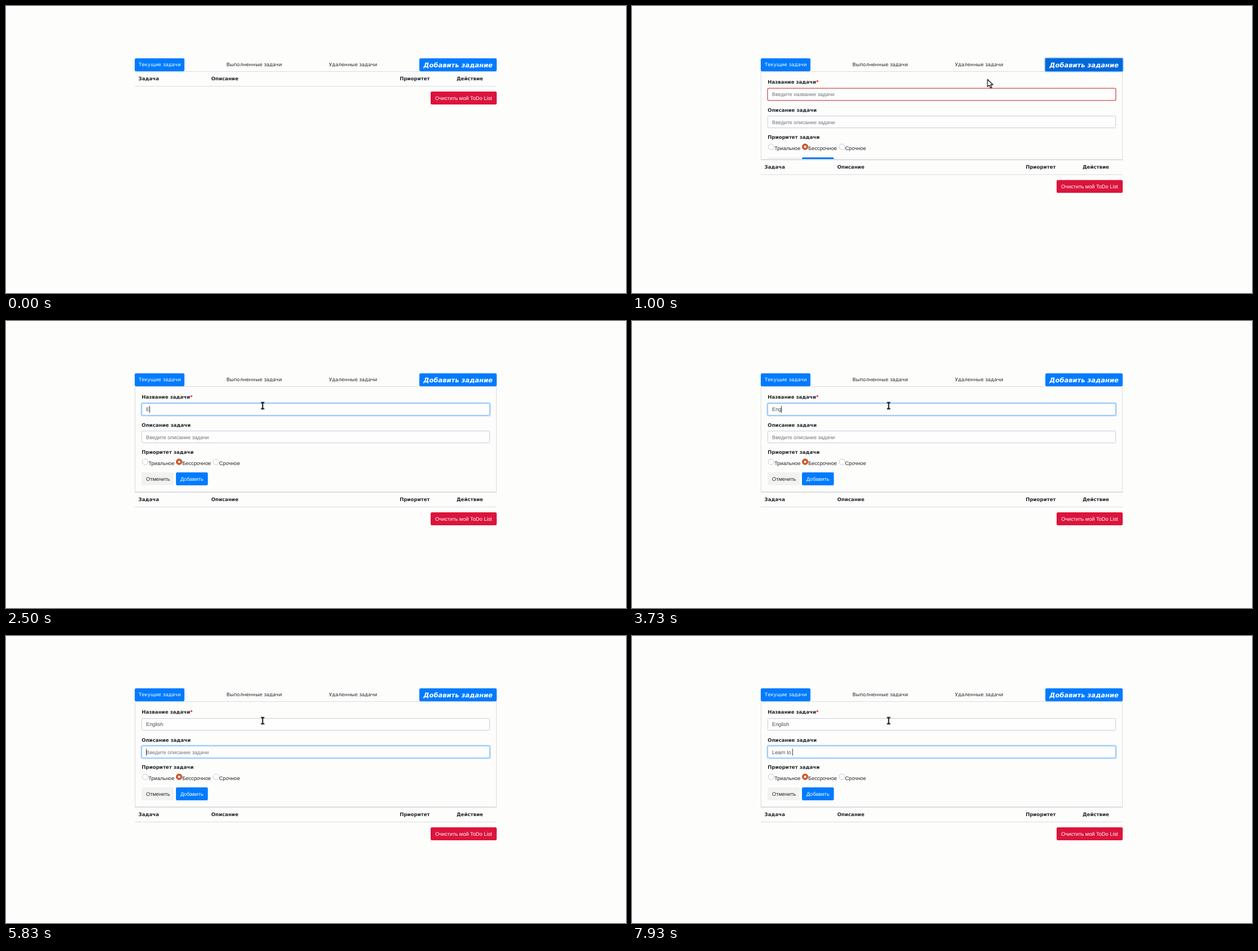
Recreate the animation shown at these times as an HTML page. Size 1098 by 510 pixels, loop 8000 ms.

```html
<!DOCTYPE html>
<html lang="ru">
<head>
<meta charset="utf-8">
<title>ToDo List</title>
<style>
  html, body { margin: 0; width: 100%; height: 100%; overflow: hidden; background: #fdfdfc; }
  #stage { position: absolute; left: 0; top: 0; width: 1098px; height: 510px; overflow: hidden; }
  svg { position: absolute; left: 0; top: 0; width: 1098px; height: 510px; overflow: hidden; }
  text { font: 9.25px "Liberation Sans", Arial, sans-serif; fill: #212529; text-rendering: geometricPrecision; white-space: pre; }
  .nav, .head { font: 8.65px "DejaVu Sans", Verdana, sans-serif; }
  .head { font-weight: bold; }
  .add { font: italic bold 11.5px "DejaVu Sans", Verdana, sans-serif; }
  .light { fill: #fff; }
  .hint { fill: #6c757d; }
  .typed { fill: #495057; }
  .star { fill: #f00; }
  .line { stroke: #dadcdf; fill: none; }
  .blue { fill: #007bff; }
  .field { fill: #fff; fill-opacity: .4; stroke: #cbccd8; }
  .ring { fill: none; stroke: #80bdff; }
  .halo { fill: none; stroke: #007bff; stroke-opacity: .27; stroke-width: 1.6; }
  .radio { fill: #fff; stroke: #c6c6d2; }

  #form { position: absolute; left: 228px; top: 116px; width: 641px; box-sizing: border-box;
          overflow: hidden; border-bottom: 1px solid #dadcdf; }
  #form svg { left: -228px; top: -116px; }

  #form, #table, #pointer, .fade, .shape { animation: 8s linear infinite; }
  #form { animation-name: unfold; }
  #table { animation-name: push; }
  #pointer { animation-name: travel; }
  #hover { animation-name: hover; }
  #glow { animation-name: glow; }
  #invalid { animation-name: invalid; }
  #focus1 { animation-name: focus1; }
  #focus2 { animation-name: focus2; }
  .shape { animation-timing-function: step-end; }
  #arrow { animation-name: arrow; }
  #hand { animation-name: hand; }
  #beam { animation-name: beam; }

  @keyframes unfold {
    0% { height: 1px; }
    10.17% { height: 1px; animation-timing-function: ease; }
    14.54%, 100% { height: 188px; }
  }
  @keyframes push {
    0% { transform: translateY(0); }
    10.17% { transform: translateY(0); animation-timing-function: ease; }
    14.54%, 100% { transform: translateY(188px); }
  }
  @keyframes travel {
    0%, 1% { transform: translate(887px, -22px); }
    6%, 10.3% { transform: translate(824.5px, 113.5px); }
    12.5% { transform: translate(630.5px, 130px); animation-timing-function: ease-out; }
    16.5%, 21.9% { transform: translate(453.5px, 150.5px); }
    22%, 100% { transform: translate(454.5px, 150.5px); }
  }
  @keyframes hover { 0%, 5.2% { opacity: 0; } 7%, 17.75% { opacity: 1; } 19.6%, 100% { opacity: 0; } }
  @keyframes glow { 0%, 9.1% { opacity: 0; } 11%, 17.75% { opacity: 1; } 19.6%, 100% { opacity: 0; } }
  @keyframes invalid { 0%, 17.75% { opacity: 1; } 19.6%, 100% { opacity: 0; } }
  @keyframes focus1 { 0%, 17.75% { opacity: 0; } 19.6%, 68.75% { opacity: 1; } 70.6%, 100% { opacity: 0; } }
  @keyframes focus2 { 0%, 68.75% { opacity: 0; } 70.6%, 100% { opacity: 1; } }
  @keyframes arrow { 0% { opacity: 1; } 5.2% { opacity: 0; } 10.6% { opacity: 1; } 14.5%, 100% { opacity: 0; } }
  @keyframes hand { 0% { opacity: 0; } 5.2% { opacity: 1; } 10.6%, 100% { opacity: 0; } }
  @keyframes beam { 0% { opacity: 0; } 14.5%, 100% { opacity: 1; } }
</style>
</head>
<body>
<div id="stage">
  <div id="form">
    <svg>
      <path class="line" d="M228.5 116V304M868.5 116V304"/>
      <text class="head" x="240.3" y="138">Название задачи<tspan class="star">*</tspan></text>
      <rect class="field" x="240.5" y="146.5" width="616" height="21" rx="2"/>
      <rect class="fade" id="invalid" x="240.2" y="146.2" width="616.6" height="21.6" rx="2.4" fill="none" stroke="#dd6a6a" stroke-width="1.6"/>
      <g class="fade" id="focus1">
        <rect class="halo" x="239.2" y="145.2" width="618.6" height="23.6" rx="3"/>
        <rect class="ring" x="240.5" y="146.5" width="616" height="21" rx="2"/>
      </g>

      <text class="head" x="240.3" y="188">Описание задачи</text>
      <rect class="field" x="240.5" y="195.5" width="616" height="21" rx="2"/>
      <g class="fade" id="focus2">
        <rect class="halo" x="239.2" y="194.2" width="618.6" height="23.6" rx="3"/>
        <rect class="ring" x="240.5" y="195.5" width="616" height="21" rx="2"/>
      </g>

      <text class="hint" id="hint1" x="248" y="160.4">Введите название задачи</text>
      <text class="hint" id="hint2" x="248" y="209.8">Введите описание задачи</text>
      <text class="typed" id="typed1" x="248" y="160.4" xml:space="preserve"></text>
      <text class="typed" id="typed2" x="248" y="209.8" xml:space="preserve"></text>
      <rect id="caret" width="1" height="12" fill="#343a40"/>

      <text class="head" x="240.3" y="236">Приоритет задачи</text>
      <circle class="radio" cx="246.4" cy="250.3" r="5.1"/>
      <circle cx="306.6" cy="250.2" r="5.1" fill="#dc5a28" stroke="#a8461f"/>
      <circle cx="306.6" cy="250.2" r="2" fill="#fff"/>
      <circle class="radio" cx="371.9" cy="250.3" r="5.1"/>
      <text x="252.2" y="255.8">Триальное</text>
      <text x="312.2" y="255.8">Бессрочное</text>
      <text x="377.4" y="255.8">Срочное</text>

      <rect x="240" y="269" width="57" height="23" rx="2.3" fill="#f2f2f1"/>
      <text x="248" y="283.6">Отменить</text>
      <rect class="blue" x="301" y="269" width="56.5" height="23" rx="2.3"/>
      <text class="light" x="308.7" y="283.6">Добавить</text>
    </svg>
  </div>

  <svg>
    <g id="table">
      <path class="line" d="M228 116.5H869M228 142.5H869"/>
      <text class="head" x="234.6" y="132">Задача</text>
      <text class="head" x="363.4" y="132">Описание</text>
      <text class="head" x="697.2" y="132">Приоритет</text>
      <text class="head" x="797.9" y="132">Действие</text>
      <rect x="752" y="152" width="117" height="23" rx="2.3" fill="#dc143c"/>
      <text class="light" x="760" y="166.5">Очистить мой ToDo List</text>
    </g>

    <path class="line" d="M228 116.5H869"/>
    <rect class="blue" x="228" y="93" width="88" height="23" rx="2.3"/>
    <text class="nav light" x="235" y="107">Текущие задачи</text>
    <text class="nav" x="390.5" y="107">Выполненные задачи</text>
    <text class="nav" x="572" y="107">Удаленные задачи</text>
    <rect class="fade" id="glow" x="730.5" y="91.5" width="140" height="26" rx="3.6" fill="#80bdff"/>
    <rect class="blue" x="732" y="93" width="137" height="23" rx="2.3"/>
    <rect class="fade" id="hover" x="732" y="93" width="137" height="23" rx="2.3" fill="#0069d9"/>
    <text class="add light" x="739.3" y="108.5">Добавить задание</text>

    <g id="pointer" stroke="#000" fill="#fff" stroke-linejoin="round">
      <path class="shape" id="arrow" stroke-width="1.2" d="M0 .3V13.4L3.1 10.6 5.3 15.6 7.5 14.6 5.4 9.8H9.6Z"/>
      <path class="shape" id="hand" stroke-width="1.2" d="M-1.5 1Q0-.8 1.5 1V5.2L6 6Q7.8 6.3 7.8 8V10.4L6.8 13.6H-.6L-4.2 9Q-4.4 7.3-3 7.5L-1.5 8.8Z"/>
      <path class="shape" id="beam" fill="none" stroke-width="1.8" d="M-3-5.5H3M0-5.5V5.5M-3 5.5H3"/>
    </g>
  </svg>
</div>

<script>
  const LOOP = 8000, BLINK = 1200;
  const $ = id => document.getElementById(id);
  const caret = $('caret');

  // Each field: when it takes focus, its text and the time of every key press.
  const fields = [
    { focus: 1420, y: 151, text: 'English', keys: [2300, 3450, 3580, 4300, 4500, 4700, 4950] },
    { focus: 5500, y: 200.5, text: 'Learn to ', keys: [6500, 6900, 7100, 7350, 7620, 7690, 7760, 7830, 7900] }
  ];
  fields.forEach((f, i) => {
    f.typed = $('typed' + (i + 1));
    f.hint = $('hint' + (i + 1));
  });

  function draw(t) {
    let active = null;
    for (const f of fields) {
      f.count = f.keys.filter(k => k <= t).length;
      const value = f.text.slice(0, f.count);
      if (f.typed.textContent !== value) f.typed.textContent = value;
      f.hint.style.visibility = f.count ? 'hidden' : 'visible';
      if (t >= f.focus) active = f;
    }
    let on = false;
    if (active) {
      const last = active.count ? active.keys[active.count - 1] : active.focus;
      on = (t - last) % BLINK < BLINK / 2;
      const width = active.count ? active.typed.getComputedTextLength() : 0;
      caret.setAttribute('x', Math.floor(248 + width));
      caret.setAttribute('y', active.y);
    }
    caret.style.visibility = on ? 'visible' : 'hidden';
  }

  let start;
  function tick(now) {
    start ??= now;
    draw((now - start) % LOOP);
    requestAnimationFrame(tick);
  }
  draw(0);
  requestAnimationFrame(tick);
</script>
</body>
</html>
```
